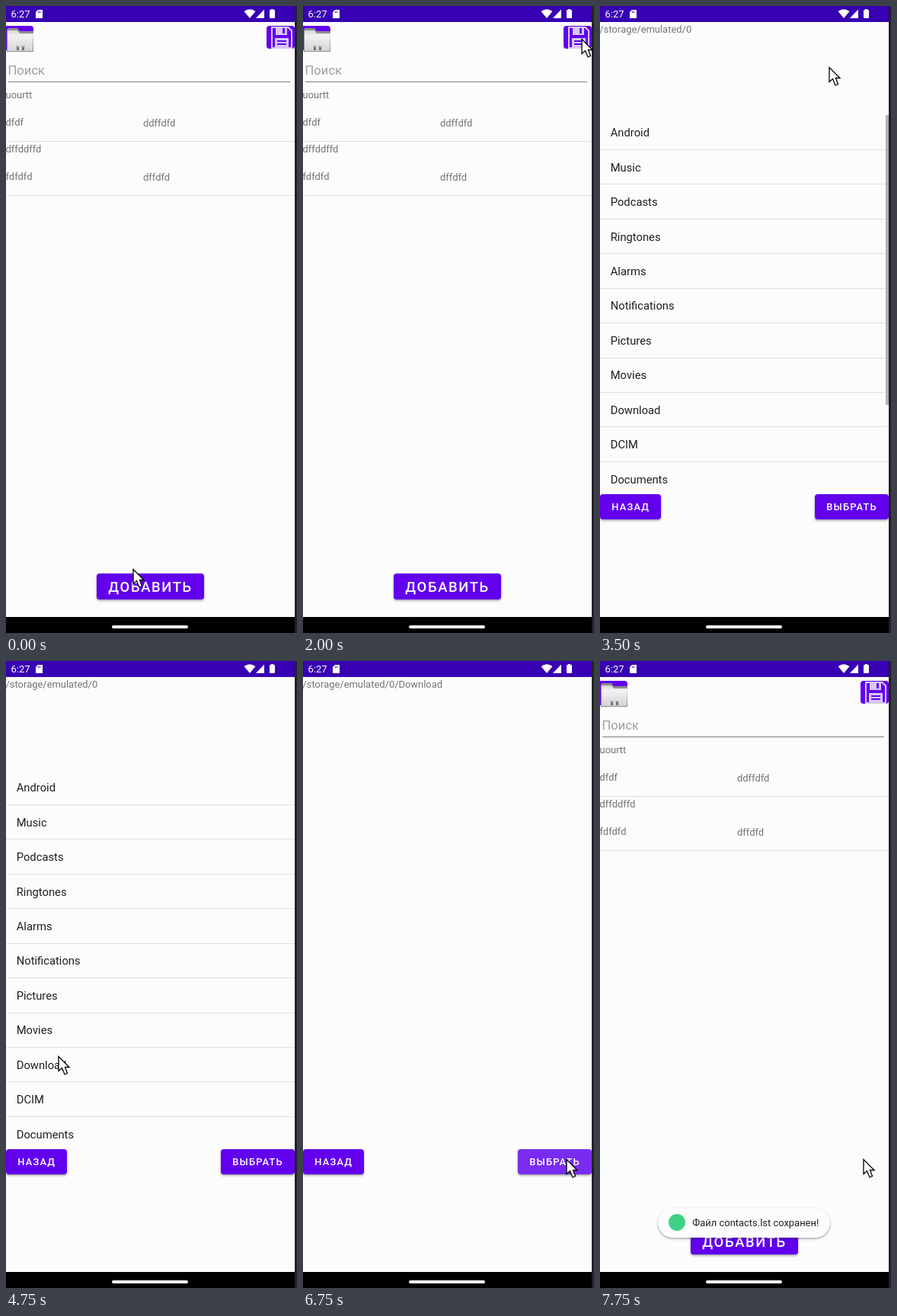
Animation of 382x822 px, one loop 8 s. Source, as an HTML page with a canvas:

```html
<!DOCTYPE html>
<html lang="ru">
<head>
<meta charset="utf-8">
<title>Contacts app</title>
<style>
  html, body { margin: 0; width: 100%; height: 100%; overflow: hidden; background: #fcfcfc; }
  canvas { display: block; width: 382px; height: 822px; }
</style>
</head>
<body>
<canvas id="stage"></canvas>
<script>
const W = 382, H = 822, LOOP = 8000, STEP = 250;
const PAPER = '#fcfcfc', BAR = '#3700b3', PURPLE = '#6200ee', PRESSED = '#792cf0';
const MUTED = '#747474', HINT = '#a0a0a0', INK = '#202020', LINE = '#e0e0e0';
const FOLDERS = ['Android', 'Music', 'Podcasts', 'Ringtones', 'Alarms', 'Notifications',
  'Pictures', 'Movies', 'Download', 'DCIM', 'Documents'];
const CONTACTS = [
  { name: 'uourtt', left: 'dfdf', right: 'ddffdfd' },
  { name: 'dffddffd', left: 'fdfdfd', right: 'dffdfd' }
];

// The pointer travels to each spot between two times
const HOME = { x: 166, y: 738 };
const MOVES = [
  { from: 0, to: 1000, x: 37, y: 33 },
  { from: 1000, to: 2000, x: 365, y: 43 },
  { from: 3000, to: 3500, x: 300, y: 80 },
  { from: 3500, to: 5000, x: 61, y: 531 },
  { from: 5750, to: 6500, x: 345, y: 653 }
];

const canvas = document.getElementById('stage');
const ctx = canvas.getContext('2d');
const ratio = window.devicePixelRatio || 1;
canvas.width = W * ratio;
canvas.height = H * ratio;

const clamp01 = v => Math.min(1, Math.max(0, v));
const easeOut = p => p * (2 - p);

function rect(x, y, w, h, color) {
  ctx.fillStyle = color;
  ctx.fillRect(x, y, w, h);
}

function box(x, y, w, h, r, color) {
  ctx.fillStyle = color;
  ctx.beginPath();
  ctx.roundRect(x, y, w, h, r);
  ctx.fill();
}

function shape(path, color) {
  ctx.fillStyle = color;
  ctx.fill(new Path2D(path));
}

function disc(x, y, r, color) {
  ctx.fillStyle = color;
  ctx.beginPath();
  ctx.arc(x, y, r, 0, Math.PI * 2);
  ctx.fill();
}

function text(str, x, y, size, color, weight = 400, spacing = 0) {
  ctx.font = `${weight} ${size}px Roboto, sans-serif`;
  ctx.letterSpacing = spacing + 'px';
  ctx.fillStyle = color;
  ctx.fillText(str, x, y);
}

const label = (str, x, y) => text(str, x, y, 12.95, MUTED);

function raisedBox(x, y, w, h, r, color, shade) {
  ctx.save();
  ctx.shadowColor = `rgba(0,0,0,${shade})`;
  ctx.shadowBlur = 3 * ratio;
  ctx.shadowOffsetY = 1.5 * ratio;
  box(x, y, w, h, r, color);
  ctx.restore();
}

function button(str, x, y, w, h, size, color = PURPLE) {
  raisedBox(x, y, w, h, 4, color, 0.4);
  text(str, x + 15.3, y + h / 2 + size * 0.37, size, '#fff', 500, size * 0.0893);
}

function statusBar() {
  rect(0, 0, W, 21, BAR);
  text('6:27', 6.5, 15, 13, '#fff');
  shape('M42 5H48V16H39V8Z', '#fff');
  rect(42, 7, 1, 2, BAR);
  rect(44, 7, 1, 2, BAR);
  shape('M320 16L312.5 7Q320 1.5 327.5 7Z', '#fff');
  shape('M339 4.5V16H328Z', '#fff');
  box(346, 5, 7, 11, 1, '#fff');
  rect(348, 4, 3, 1, '#fff');
}

function frameEdges() {
  rect(0, 801, W, 21, '#000');
  box(139, 812, 100, 4, 2, '#fff');
  rect(379, 0, 3, H, '#222');
}

function folderIcon() {
  box(-4, 26, 40, 32, 4, PURPLE);
  shape('M1 31L3 29H15L18 33H36V60H1Z', '#8c8c90');
  const g = ctx.createLinearGradient(0, 32, 0, 60);
  g.addColorStop(0, '#d4d4d6');
  g.addColorStop(0.25, '#f2f2f2');
  g.addColorStop(1, '#d2d2d4');
  shape('M2 32H15L18 36H36L35 59H2Z', g);
  for (const x of [14, 21]) {
    rect(x, 52, 3, 6, '#707074');
    rect(x + 1, 51, 1, 3, '#fff');
  }
}

function saveIcon(pressed) {
  const base = pressed ? PRESSED : PURPLE, light = '#d6c8f4';
  box(342, 26, 37, 30, 4, base);
  shape('M348 27H371L376 32V56H348Z', light);
  shape('M350 29H370L374 33V54H350Z', base);
  rect(354, 28, 15, 10, light);
  rect(363, 29, 3, 7, base);
  rect(353, 42, 18, 13, light);
  for (const y of [45, 49]) rect(356, y, 12, 2, base);
}

function mainScreen(pressed) {
  folderIcon();
  saveIcon(pressed);
  text('Поиск', 2.5, 90, 16.6, HINT);
  rect(3, 99, 370, 1, '#808080');
  CONTACTS.forEach(({ name, left, right }, i) => {
    const y = 121 + i * 71;
    label(name, -0.5, y);
    label(left, -0.5, y + 36);
    label(right, 180, y + 37);
    rect(0, y + 56, 379, 1, LINE);
  });
  button('ДОБАВИТЬ', 119, 744, 141, 34, 18.4);
}

function folderList(t) {
  ctx.save();
  ctx.beginPath();
  ctx.rect(0, 143, 379, 497);
  ctx.clip();
  FOLDERS.forEach((name, i) => {
    const top = 143 + i * 45.43;
    if (name === 'Download' && t >= 5500) rect(0, top, 379, 45, LINE);
    text(name, 13.7, Math.round(top + 28.3), 14.77, INK);
    rect(0, Math.round(top + 45), 379, 1, LINE);
  });
  ctx.globalAlpha = clamp01((4500 - t) / 500);
  rect(375, 143, 4, 380, '#b0b0b0');
  ctx.restore();
}

function pickerScreen(t) {
  const opened = t >= 5750;
  label('/storage/emulated/0' + (opened ? '/Download' : ''), -0.5, 35);
  if (!opened) folderList(t);
  button('НАЗАД', 0, 640, 80, 33, 12.9);
  button('ВЫБРАТЬ', 282, 640, 97, 33, 12.9, t >= 6750 ? PRESSED : PURPLE);
}

function toast(alpha) {
  const scale = 0.975 + 0.025 * alpha;
  ctx.save();
  ctx.translate(189, 737);
  ctx.scale(scale, scale);
  ctx.translate(-189, -737);
  raisedBox(76, 717, 226, 39, 19.5, PAPER, 0.35 * alpha);
  ctx.globalAlpha = alpha;
  disc(101, 736, 11, '#3fd285');
  text('Файл contacts.lst сохранен!', 121.3, 741, 12.95, INK);
  ctx.restore();
}

function pointerAt(t) {
  return MOVES.reduce((pos, { from, to, x, y }) => {
    const p = easeOut(clamp01((t - from) / (to - from)));
    return { x: pos.x + (x - pos.x) * p, y: pos.y + (y - pos.y) * p };
  }, HOME);
}

function pointer(t) {
  const { x, y } = pointerAt(t);
  const arrow = new Path2D('M0 0V19L4.5 15L8 23.5L11.5 22L8.5 14H14Z');
  ctx.save();
  ctx.translate(Math.round(x) + 1, Math.round(y) + 0.5);
  ctx.fillStyle = '#fff';
  ctx.fill(arrow);
  ctx.strokeStyle = '#000';
  ctx.lineWidth = 1.3;
  ctx.stroke(arrow);
  ctx.restore();
}

function draw(now) {
  const t = Math.floor((now % LOOP) / STEP) * STEP;
  ctx.setTransform(ratio, 0, 0, ratio, 0, 0);
  rect(0, 0, W, H, PAPER);
  statusBar();
  if (t >= 3250 && t < 7500) pickerScreen(t);
  else mainScreen(t >= 2750 && t < 3250);
  if (t >= 7250) toast(t < 7500 ? 0.4 : 1);
  frameEdges();
  pointer(t);
}

const start = performance.now();
function tick() {
  draw(performance.now() - start);
  requestAnimationFrame(tick);
}
tick();
</script>
</body>
</html>
```
